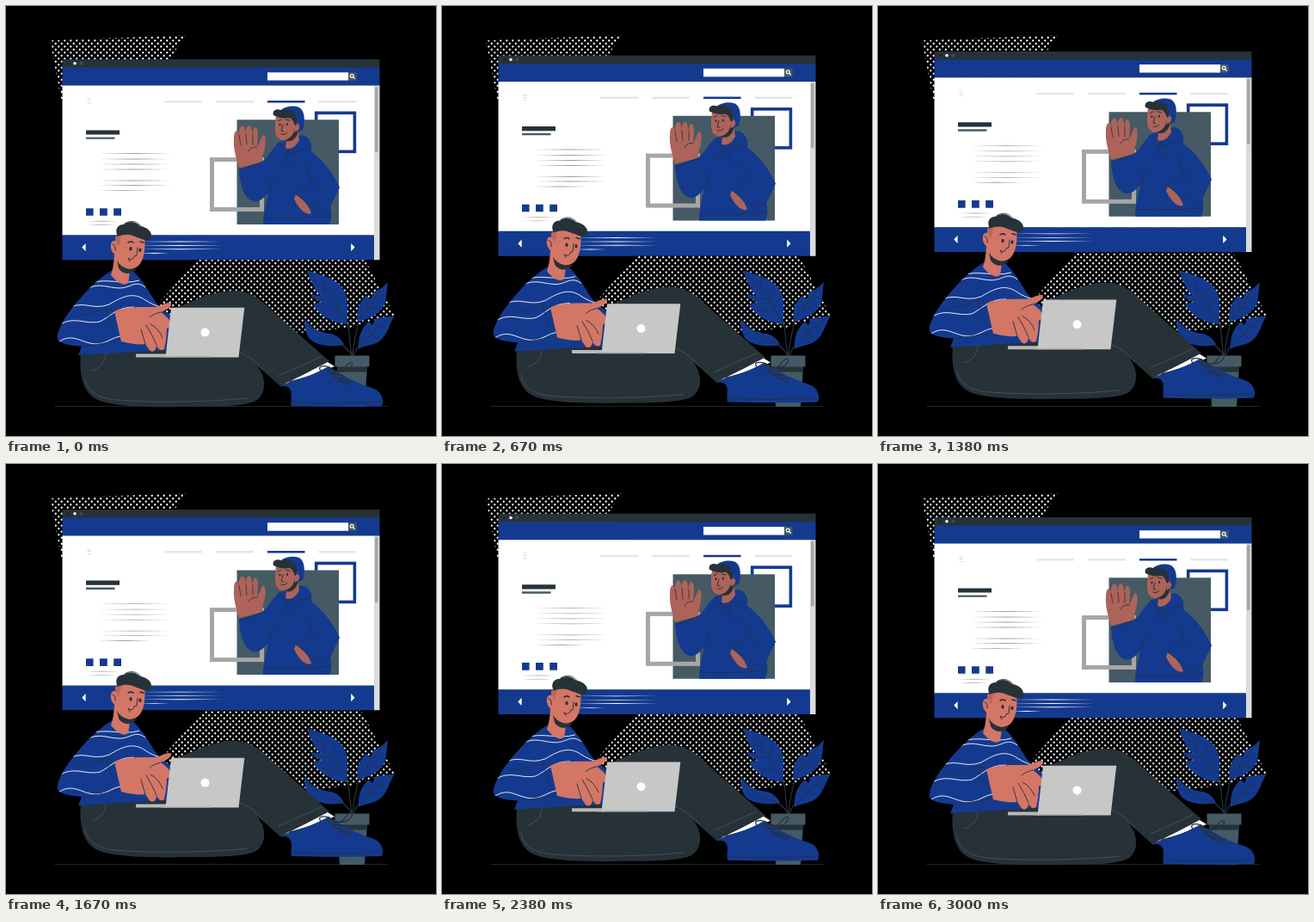
These frames come from a looping animation (500x500 px, 3.04 s). An HTML page:

```html
<!DOCTYPE html>
<html lang="en">
<head>
<meta charset="utf-8">
<title>Browsing a website</title>
<style>
html, body { margin: 0; width: 100%; height: 100%; overflow: hidden; background: #000; }
svg { display: block; width: 100vw; height: 100vh; }
.blue { fill: #143a8f; }
.dark { fill: #263238; }
.slate { fill: #455a64; }
.skin { fill: #d37666; }
.tan { fill: #ad6359; }
.line { fill: none; stroke: #263238; stroke-linecap: round; stroke-linejoin: round; }
.fine { fill: none; stroke: #455a64; stroke-width: .8; stroke-linecap: round; }
.wave { fill: none; stroke: #fff; stroke-width: .9; }
</style>
</head>
<body>
<svg viewBox="0 0 500 500">
  <defs>
    <pattern id="dots" width="7" height="7" patternUnits="userSpaceOnUse">
      <circle cx="1.75" cy="1.75" r="1.15" fill="#fff"/>
      <circle cx="5.25" cy="5.25" r="1.15" fill="#fff"/>
    </pattern>
    <path id="sweater" d="M124 307C104 318 80 345 68 364C61 376 57 386 62 390C68 394 80 395 88 396L84 406L150 402L190 400L196 362C188 358 180 352 173 343C165 330 157 316 146 307Z"/>
    <clipPath id="knit"><use href="#sweater"/></clipPath>
  </defs>

  <path fill="url(#dots)" d="M51 40L209 34L190 62L412 285L452 360L425 366L400 374L345 380L270 376L165 360L228 288L64 108Z"/>
  <path d="M57 465.5H443" class="fine" stroke="#263238" style="stroke:#263238"/>

  <g id="plant">
    <g class="line" stroke-width="1.2">
      <path d="M402 406C399 390 400 375 396 366M403 406C404 390 408 376 411 363M402 406C396 396 390 393 378 390M404 406C408 396 414 390 424 382"/>
    </g>
    <g class="blue">
      <path d="M350 307C365 312 385 317 393 330C400 342 396 357 397 370C382 369 365 362 357 347L367 344L356 339L355 335L366 337C357 329 354 318 350 307Z"/>
      <path d="M444 321C442 335 443 346 437 352C430 361 419 364 409 368C407 355 410 344 419 337L424 341L427 333C434 330 440 326 444 321Z"/>
      <path d="M347 363C354 374 365 380 378 381C386 383 391 389 393 394C380 397 362 395 354 388C347 381 348 371 347 363Z"/>
      <path d="M452 360C446 369 444 382 435 389C428 395 418 394 410 399C409 386 413 374 422 367L426 371L429 364C437 361 445 362 452 360Z"/>
    </g>
    <g class="line" stroke-width=".8">
      <path d="M352 309Q378 336 396 367M371 331L370 321M380 342L383 327M386 350L394 337M379 341L364 340M388 354L368 354M442 323Q423 347 410 366M428 341L438 339M420 351L432 352M420 351L418 343M350 367Q362 387 390 393M450 361Q428 374 411 398M432 373L441 374M423 381L433 385M424 380L421 374"/>
    </g>
    <path class="slate" d="M385 418H420L417 466H388Z"/>
    <path class="dark" d="M385 419H420L419.500 425.500H385.500Z"/>
    <path class="slate" d="M382.500 406.500H422.500V419.500H382.500Z"/>
  </g>

  <g id="float">
    <g id="window">
      <path class="dark" d="M65.500 62H434.500V72H65.500Z"/>
      <circle cx="73" cy="66.700" r="1.600" fill="#1b2429"/>
      <circle cx="80" cy="66.700" r="1.800" fill="#fff"/>
      <circle cx="87.300" cy="66.700" r="1.300" fill="none" stroke="#5b6b74" stroke-width=".8"/>
      <path class="blue" d="M65.500 71.500H434.500V93H65.500Z"/>
      <path fill="#fff" d="M65.500 92.500H428V267H65.500ZM304 77.200H398V86.600H304Z"/>
      <path class="slate" d="M398 77.200H407.500V86.600H398Z"/>
      <g fill="none" stroke="#fff" stroke-width="1.200"><circle cx="402.200" cy="81.200" r="1.900"/><path d="M403.600 82.600L405.600 84.700"/></g>
      <path fill="#dbdbdb" d="M428 92.500H434.500V295.200H428Z"/>
      <rect x="429" y="94" width="3.600" height="76" rx="1.500" fill="#a6a6a6"/>
      <path class="blue" d="M65.500 266.300H428V295.200H65.500Z"/>
      <path fill="#fff" d="M88.300 280.600L92.600 276V285.200ZM405.500 280.600L401.200 276V285.200Z"/>
      <g id="copy"></g>
      <path fill="#e6e6e6" d="M184.500 110H228V112.500H184.500ZM244 110H288V112.500H244ZM363.500 110H407V112.500H363.500Z"/>
      <path class="blue" d="M304 110H347.500V112.500H304ZM93 235.200h8.600v8.600h-8.600ZM109 235.200h8.800v8.600h-8.800ZM125.200 235.200h8.800v8.600h-8.800Z"/>
      <path class="dark" d="M93 144.400H132V149.600H93Z"/>
      <path class="slate" d="M93 152.400H126.500V154.800H93Z"/>
      <rect x="360.700" y="124.300" width="44.700" height="45" fill="none" stroke="#143a8f" stroke-width="3.600"/>
      <path class="slate" d="M268.500 132.300H387V254H268.500Z"/>
      <rect x="239.500" y="178.500" width="58" height="58" fill="none" stroke="#a6a6a6" stroke-width="5"/>
    </g>

    <g id="waver">
      <path class="blue" d="M318 158C309 166 304 176 300 180L271 190C272 208 277 224 287 227C294 229 300 223 305 217C302 230 299 243 299 254H376C379 247 379 239 377 234L388 211C379 191 366 177 355 169C357 160 352 151 344 150Z"/>
      <path class="tan" d="M327 149L339 144L341 156C337 164 330 168 325 165Z"/>
      <path class="tan" d="M314 127C313 137 312 147 315 152C319 158 330 158 335 153C340 149 342 139 338 128Z"/>
      <path class="dark" d="M323 156C331 155 335 149 337 139L340 141C340 150 335 159 326 157Z"/>
      <path class="blue" d="M318 123C322 117 333 115 341 118C348 122 348 135 345 144L339 146C341 140 338 131 335 127Z"/>
      <path class="dark" d="M311 127C309 121 315 119 320 121C328 119 337 122 337 128C339 132 339 137 337 142C335 137 334 132 330 130C323 131 317 130 311 127Z"/>
      <path class="tan" d="M336 139C340 135 343 139 340 144L336 147Z"/>
      <g class="line" stroke-width="1">
        <path d="M316 134L320 132M325 132L330 133M322 138L320 145L323 146M320 149Q324 151 327 147"/>
        <path stroke-width="2" d="M318.500 137.500v1M327 137v1"/>
      </g>
      <path class="tan" d="M271 188C268 178 264 166 265 154C265 145 269 142 271 150C270 140 276 135 278 144L279 149C278 138 285 135 286 146L287 150C287 138 293 139 293 149L292 164C295 160 296 153 299 150C303 151 302 161 300 169C297 177 298 179 299 181Z"/>
      <path class="line" stroke-width=".8" d="M271 150L273 162M279 149L280 161M287 150L287 161M292 164Q285 163 282 169"/>
      <path class="tan" d="M337 219C344 224 352 231 355 241C349 244 340 236 335 224Z"/>
      <g class="line" stroke-width=".8">
        <path d="M271 190Q289 187 301 179M318 159Q323 168 330 172Q346 169 355 160M330 166L322 183M336 170L333 187M347 184L356 203L337 219L367 239L377 234M356 203L365 213M305 217Q310 207 310 198M300 246Q335 248 377 244"/>
      </g>
    </g>

    <g id="sitter">
      <path class="dark" d="M196 352C222 341 243 330 269 331C286 333 296 341 308 353L376 413C363 424 342 436 320 443L292 418C303 433 303 449 292 458C280 466 245 466 211 466C172 467 128 466 109 459C88 451 85 427 87 402L190 397Z"/>
      <path class="fine" d="M92 433C94 449 108 456 128 458C180 462 240 460 281 456M116 403C117 413 110 421 100 424M317 430Q342 419 366 408M269 402Q283 405 299 423"/>
      <use href="#sweater" class="blue"/>
      <g clip-path="url(#knit)" class="wave">
        <path d="M94 329C108 321 119 328 132 328C145 328 150 318 162 327M75 350C93 343 101 354 120 347C138 336 149 333 162 342C176 351 184 351 198 351M58 374C77 358 91 371 109 367C122 361 128 350 149 350M57 394C76 377 86 392 104 393C121 393 124 381 145 384M97 323C115 315 135 325 155 319"/>
      </g>
      <path class="line" stroke-width=".8" d="M80 362L116 352Q124 352 128 354M88 396Q110 393 132 389M116 352L125 377"/>
      <path fill="#b9b9b9" d="M151 404.500H190V408.500H151Z"/>
      <path class="skin" d="M126 355C139 349 156 350 171 350C179 350 186 344 191 345C195 348 188 353 180 356C187 361 192 365 192 372L187 375C187 382 186 391 184 399C180 402 176 398 175 394C175 402 169 404 166 399L162 393C155 394 145 393 134 390Z"/>
      <path class="line" stroke-width=".9" d="M180 356Q171 358 167 362M163 371Q170 382 175 394M168 370Q178 375 182 386M157 376L162 393"/>
      <path fill="#c7c7c7" d="M192 350.700H277.300L270.500 408.500H185.500Z"/>
      <path fill="#a6a6a6" d="M180 407.300H238V408.600H180Z"/>
      <circle cx="231.500" cy="379.500" r="5" fill="#fff"/>

      <path class="skin" d="M126 285C126 298 124 307 122 313C130 322 136 326 142 322L145 303Z"/>
      <path class="dark" d="M129 296C136 304 143 308 152 305C148 312 137 314 131 305Z"/>
      <path class="skin" d="M130 264C127 275 126 290 131 299C138 307 149 308 155 301C162 292 162 279 161 265Z"/>
      <path class="skin" d="M130 275C124 270 121 275 122 282C124 288 127 290 130 289Z"/>
      <path fill="#b96859" d="M127 268H134L132 277C130 283 130 275 127 273Z"/>
      <path class="dark" d="M130 268C126 261 129 254 137 254C143 249 151 251 156 256C164 257 172 263 168 271C163 275 157 270 152 269C146 266 140 264 130 268Z"/>
      <path class="line" stroke-width=".8" d="M138 253C144 249 151 249 157 256"/>
      <g class="line">
        <path stroke-width="1.600" d="M142 275Q145 273 148 275M156 274L160 275"/>
        <path stroke-width="1" d="M153 281L152 290L149 291M143 294Q147 296 149 292M124 277Q128 278 127 284M142 293L144 297"/>
        <path stroke-width="3" d="M145 281.500v1.500M156 283v1.500"/>
      </g>

      <path fill="#fff" d="M328 437L322 441C340 431 358 423 374 414L382 419L360 428Z"/>
      <path class="blue" d="M320 441C336 436 355 430 375 419C388 427 401 436 428 445C437 449 440 458 437 465C408 466 362 466 332 465C330 455 335 449 328 443Z"/>
      <path class="line" stroke-width=".9" d="M333 460.500C365 463 400 462 437 460"/>
      <path class="line" stroke-width="1.300" d="M366 424C362 420 367 417 376 420C385 429 391 426 395 419C401 412 405 414 401 420C397 426 386 427 376 422M376 426L392 430M382 432L397 434M389 437L403 437M374 423Q386 436 402 441"/>
    </g>
  </g>
</svg>
<script>
// Thin tapered text lines: left, right, centre y, colour
const rules = [
  ...[171.5, 178, 184, 190, 203, 208.5].map(y => [107, 192, y, '#999']),
  [107, 169, 214.4, '#999'], [93, 132, 250.2, '#aaa'], [94, 128, 254.3, '#aaa'],
  ...[108, 110.7, 113.4].map(y => [93, 100, y, '#ccc']),
  ...[274, 278.5, 282.7].map(y => [155, 251, y, '#fff']),
  [155, 190, 287.5, '#fff']
];
document.getElementById('copy').innerHTML = rules.map(([a, b, y, color]) =>
  `<path fill="${color}" d="M${a} ${y}Q${(a + b) / 2} ${y - .9} ${b} ${y}Q${(a + b) / 2} ${y + .9} ${a} ${y}Z"/>`
).join('');

const float = document.getElementById('float');
const LOOP = 3040, STEPS = 72, RISE = 10;

function draw(now) {
  const step = Math.min(STEPS, Math.floor((now % LOOP + 4) * .024));
  const lift = RISE * (1 - Math.abs(2 * step / STEPS - 1));
  float.setAttribute('transform', `translate(0 ${-lift})`);
}

const start = performance.now();
(function tick() {
  draw(performance.now() - start);
  requestAnimationFrame(tick);
})();
</script>
</body>
</html>
```
